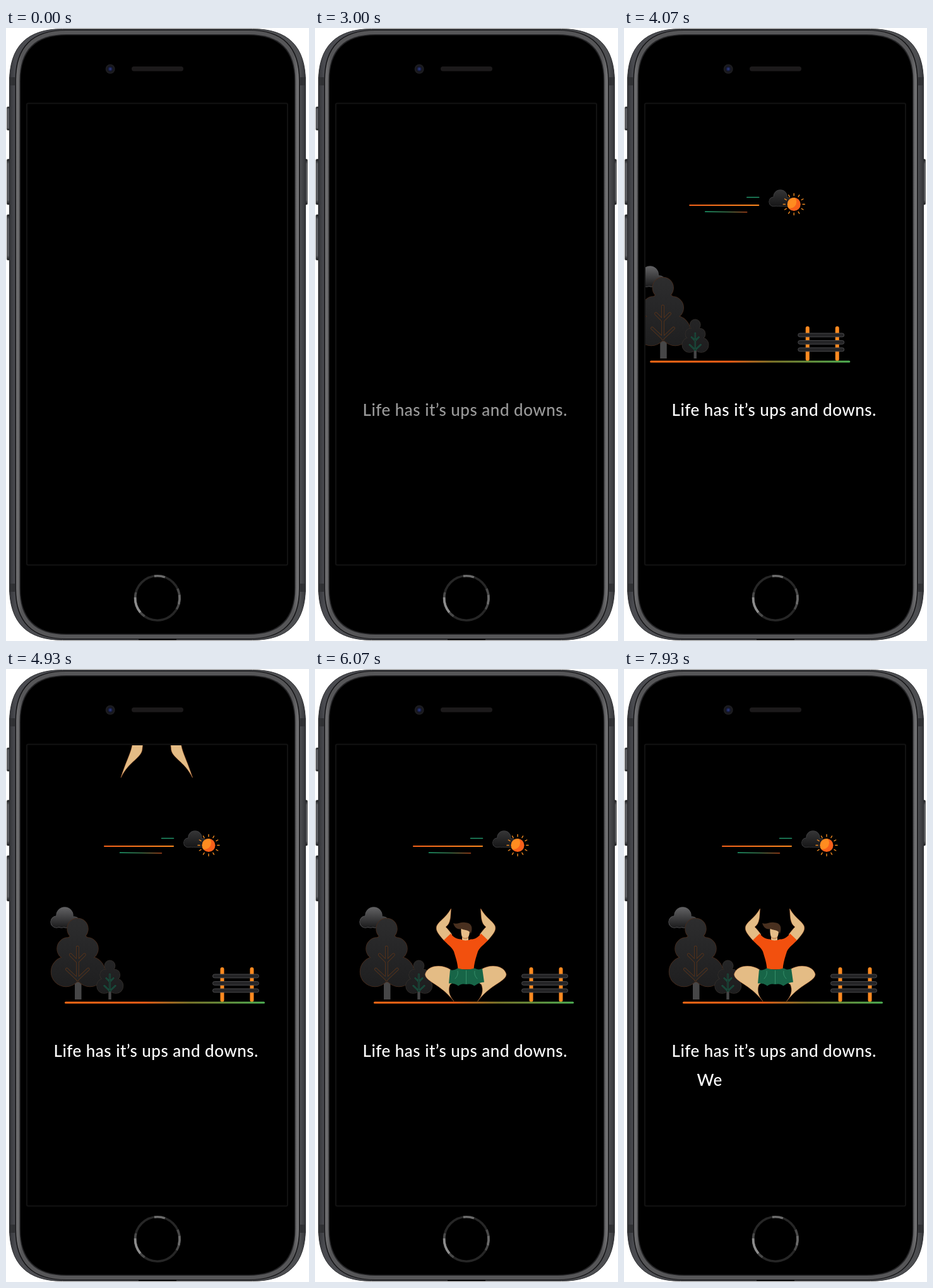
Recreate the animation shown at these times as an HTML page. Size 480x972 px, loop 8 s.

```html
<!DOCTYPE html>
<html lang="en">
<head>
<meta charset="utf-8">
<title>Life has it’s ups and downs</title>
<style>
html, body { margin: 0; width: 100%; height: 100%; overflow: hidden; background: #fff; }
svg { display: block; width: 480px; height: 972px; }
text { font: 500 26px Lato, "Open Sans", sans-serif; letter-spacing: .5px; fill: #fff; }
</style>
</head>
<body>
<svg viewBox="0 0 480 972">
  <defs>
    <clipPath id="screen"><rect x="34" y="121" width="411" height="729"/></clipPath>
    <linearGradient id="edge" x2="1" y2="0">
      <stop offset="0" stop-color="#6c6c6e"/><stop offset=".006" stop-color="#6c6c6e"/>
      <stop offset=".02" stop-color="#565658"/><stop offset=".98" stop-color="#565658"/>
      <stop offset=".994" stop-color="#6c6c6e"/><stop offset="1" stop-color="#7c7c7e"/>
    </linearGradient>
    <linearGradient id="shell" x2="1" y2="0">
      <stop offset="0" stop-color="#343539"/><stop offset=".018" stop-color="#4a4b50"/>
      <stop offset=".5" stop-color="#55565a"/><stop offset=".982" stop-color="#4d4e51"/>
      <stop offset="1" stop-color="#343539"/>
    </linearGradient>
    <linearGradient id="key" x2="0" y2="1">
      <stop offset="0" stop-color="#1c1d1f"/><stop offset=".1" stop-color="#5c5d61"/>
      <stop offset=".9" stop-color="#5c5d61"/><stop offset="1" stop-color="#1c1d1f"/>
    </linearGradient>
    <radialGradient id="lens">
      <stop offset="0" stop-color="#34418c"/><stop offset=".4" stop-color="#141a3c"/>
      <stop offset=".6" stop-color="#17171b"/><stop offset="1" stop-color="#202024"/>
    </radialGradient>
    <linearGradient id="ground" gradientUnits="userSpaceOnUse" x1="93" y1="0" x2="410" y2="0">
      <stop offset="0" stop-color="#ff6b16"/><stop offset=".4" stop-color="#ef5f17"/>
      <stop offset=".62" stop-color="#7f7a2c"/><stop offset="1" stop-color="#4fb254"/>
    </linearGradient>
    <linearGradient id="breeze" gradientUnits="userSpaceOnUse" x1="180" y1="0" x2="247" y2="0">
      <stop offset="0" stop-color="#1fa573"/><stop offset=".5" stop-color="#3a7b50"/>
      <stop offset="1" stop-color="#b3461b"/>
    </linearGradient>
    <linearGradient id="gust" gradientUnits="userSpaceOnUse" x1="155" y1="0" x2="266" y2="0">
      <stop offset="0" stop-color="#f4621a"/><stop offset="1" stop-color="#ff8a1f"/>
    </linearGradient>
    <linearGradient id="mist" gradientUnits="userSpaceOnUse" x1="0" y1="378" x2="0" y2="410">
      <stop offset="0" stop-color="#626264"/><stop offset="1" stop-color="#1c1c1d"/>
    </linearGradient>
    <linearGradient id="dusk" gradientUnits="userSpaceOnUse" x1="0" y1="257" x2="0" y2="283">
      <stop offset="0" stop-color="#353536"/><stop offset="1" stop-color="#161617"/>
    </linearGradient>
    <linearGradient id="leaf" gradientUnits="userSpaceOnUse" x1="0" y1="395" x2="0" y2="516">
      <stop offset="0" stop-color="#2d2d2e"/><stop offset="1" stop-color="#1d1d1e"/>
    </linearGradient>
    <clipPath id="disc"><circle cx="321" cy="279.5" r="10.5"/></clipPath>
  </defs>

  <g id="phone"></g>

  <g clip-path="url(#screen)">
    <g id="park"></g>
    <g id="man">
      <g id="legs" fill="#e4bc85" stroke="#c9753c" stroke-width=".5" stroke-linejoin="round">
        <path class="leg"/><path class="leg" transform="translate(477.5 0) scale(-1 1)"/>
      </g>
      <g id="body"></g>
    </g>
    <text id="line1" x="75.5" y="615">Life has it’s ups and downs.</text>
    <text id="line2" x="115.5" y="661">We</text>
  </g>
</svg>
<script>
const $ = id => document.getElementById(id);
const box = (x, y, w, h, r, fill, more = '') =>
  `<rect x="${x}" y="${y}" width="${w}" height="${h}" rx="${r}" fill="${fill}" ${more}/>`;
const stroke = (d, color, width, cap = 'round') =>
  `<path d="${d}" fill="none" stroke="${color}" stroke-width="${width}" stroke-linecap="${cap}" stroke-linejoin="round"/>`;

// box with smooth corners, centred on the phone's axis
function hull(x, y, r, fill, more = '') {
  const w = 480 - 2 * x, h = 972 - 2 * y, k = r * .67, s = r - k;
  const d = `M${x} ${y + r}c0 ${-k} ${s} ${-r} ${r} ${-r}h${w - 2 * r}c${k} 0 ${r} ${s} ${r} ${r}` +
    `v${h - 2 * r}c0 ${k} ${-s} ${r} ${-r} ${r}h${2 * r - w}c${-k} 0 ${-r} ${-s} ${-r} ${-r}Z`;
  return `<path d="${d}" fill="${fill}" ${more}/>`;
}

function arc(x, y, r, from, to) {
  const at = a => `${x + r * Math.cos(a * Math.PI / 180)} ${y + r * Math.sin(a * Math.PI / 180)}`;
  return `M${at(from)}A${r} ${r} 0 0 1 ${at(to)}`;
}

// overlapping circles merged into one outlined shape
function blob(circles, fill, line) {
  const all = circles.map(([x, y, r]) => `<circle cx="${x}" cy="${y}" r="${r}"/>`).join('');
  return `<g fill="${line}" stroke="${line}" stroke-width="1.4">${all}</g><g fill="${fill}">${all}</g>`;
}

function cloud(x, y, k, fill, line) {
  const shapes = [[10, 23, 9], [23, 13, 13], [38, 23.5, 8.5], [18, 24, 8], [25, 22, 10], [31, 23, 9]];
  return blob(shapes.map(([a, b, r]) => [x + a * k, y + b * k, r * k]), fill, line);
}

function twigs(x, y, k, color) {
  const d = `M${x} ${y}V${y + 52 * k}M${x - 17 * k} ${y + 35 * k}L${x} ${y + 51 * k}L${x + 17 * k} ${y + 35 * k}` +
    `M${x - 11 * k} ${y + 12 * k}L${x} ${y + 23 * k}L${x + 11 * k} ${y + 12 * k}`;
  return stroke(d, color, 4.6 * k) + stroke(d, '#242425', 4.6 * k - 1.4);
}

function drawPhone() {
  let s = '';
  for (const [x, y, h] of [[1.5, 125, 37], [1.5, 208, 72], [1.5, 296, 72], [472.5, 208, 72]])
    s += box(x, y, 5, h, 1.5, 'url(#key)', 'stroke="#2b2c2e" stroke-width=".6"');
  s += hull(5.5, 1.5, 84, 'url(#shell)', 'stroke="#2a2b2e" stroke-width="1"');
  for (const y of [78, 881]) for (const x of [5, 466]) s += box(x, y, 9, 13, 0, '#303134');
  s += box(210, 968, 60, 3, 1, '#19191b');
  s += hull(14.5, 3, 80, '#121214');
  s += hull(16, 4, 79, 'url(#edge)');
  s += hull(21.5, 10, 74, '#242426');
  s += hull(23, 11.5, 73, '#000');
  s += box(33, 119.5, 413, 732, 2, '#000', 'stroke="#121212" stroke-width="2"');
  s += box(199, 61, 82, 7.5, 3.7, '#1c1a1b');
  s += '<circle cx="165.2" cy="65" r="7.5" fill="url(#lens)"/>';

  const ring = (from, to, color) => stroke(arc(239.8, 904, 35.2, from, to), color, 3.6, 'butt');
  s += ring(0, 180, '#262626') + ring(180, 360, '#262626');
  s += ring(125, 195, '#484848') + ring(140, 182, '#8c8c8c');
  s += ring(262, 290, '#6a6a6a') + ring(-25, 30, '#484848') + ring(-8, 16, '#6a6a6a');
  $('phone').innerHTML = s;
}

function drawPark() {
  let s = stroke('M156 281H265', 'url(#gust)', 2.2) +
    stroke('M246.5 268.5H265.5', '#22966b', 1.5) +
    stroke('M180.5 291.2L246.5 292', 'url(#breeze)', 1.5);
  s += cloud(281, 257, .8, 'url(#dusk)', '#404042');

  let rays = '';
  for (let i = 0; i < 12; i++) {
    const a = i * Math.PI / 6, c = Math.cos(a), n = Math.sin(a);
    rays += `M${321 + 13.8 * c} ${279.5 + 13.8 * n}L${321 + 17 * c} ${279.5 + 17 * n}`;
  }
  s += stroke(rays, '#f08a22', 1.4);
  s += '<g clip-path="url(#disc)">' + box(310, 268, 22, 23, 0, '#f8601a') +
    '<circle cx="314.5" cy="275.5" r="10.5" fill="#ff8c20"/></g>';

  s += cloud(70, 378, 1, 'url(#mist)', '#58585a');
  s += box(109, 488, 10.5, 36, 0, '#464647');
  const crown = [[95, 480, 23.5], [133, 480, 23.5], [114, 472, 24], [98.5, 443.5, 17.5], [128.5, 443.5, 17.5],
    [114, 442, 22], [113.5, 412, 16.5]];
  s += blob(crown, 'url(#leaf)', '#4a2c1b') + twigs(113.3, 441, 1, '#633718');
  s += box(162.3, 506, 4.4, 18, 0, '#464647');
  const bush = [[155.5, 502.5, 11.5], [174, 502.5, 11.5], [165, 499, 12], [157.5, 485, 8.5], [172, 485, 8.5],
    [165, 484, 10], [164.5, 470.5, 8.2]];
  s += blob(bush, 'url(#leaf)', '#35302c') + twigs(164.5, 484, .52, '#126349');

  for (const x of [339.5, 386.5]) s += box(x, 473, 6, 55, 3, '#ff8a20');
  for (const y of [484, 495.5, 507]) s += box(327.5, y, 73, 5.8, 2.9, '#242426', 'stroke="#48484a" stroke-width="1"');
  s += stroke('M94.5 529H408.5', 'url(#ground)', 3.2);
  $('park').innerHTML = s;
}

function drawBody() {
  const flip = 'transform="translate(478 0) scale(-1 1)"';
  const arm = 'M204 430C196 421 190 414 193 407C198 398 207 395 215.5 380C214.5 392 215.5 403 207 409C211 413 214 417 217 421L208 432Z';
  const skin = 'fill="#e4bc85" stroke="#c9753c" stroke-width=".5"';
  let s = `<path d="${arm}" ${skin}/><path d="${arm}" ${skin} ${flip}/>`;
  s += '<path d="M231.5 410H245C245.5 419 244 423 243 425V432H233V425C231.5 421 231 416 231.5 410Z" fill="#e6bd88"/>';
  s += '<path d="M233 424C236 427 240 427 243 424V426.5C240 429 236 429 233 426Z" fill="#c98f5c"/>';
  s += '<path d="M219 403C226 405.5 230 400.5 238 402C248 402.5 251 410 246.500 420C244.5 413 238 415 232 412C226 414 221 410 219 403Z" fill="#49301f"/>';
  s += '<path d="M204 430L215 419.5C219 425 224 428.5 231 428.5C236 431 241 431 247 428.5C254 428.5 259 425 263 419.5L274 430C268 437 261 441 258 448C255 458 252 466 251.5 476.5H226.5C226 466 223 458 220 448C217 441 210 437 204 430Z" fill="#f2500e"/>';
  s += '<path d="M214 477C218 478 222 477 226 474.5C235 477 244 477 253 474.5C257 477 261 477 265 475L268 496.5C262 497 257 499 252.5 502.5C248 499 244 499 239.5 500C235 499 231 499 227 502.5C223 499 218 498 212 498.5Z" fill="#176547"/>';
  s += stroke('M239.5 478V499M226 479C227 484 225 488 222 491M253 479C252 484 254 488 257 491', '#3f9a74', .8);
  $('body').innerHTML = s;
}

// hip, knee, toe and crotch as four curves: straight and squatting
const straight = [213, 414, 208, 430, 203, 450, 200.5, 472, 198, 489, 192, 496, 182, 527,
  195, 500, 216, 496, 216, 480, 217, 468, 222, 450, 227, 437];
const squat = [215, 477, 200, 467, 178, 470, 174.5, 484, 175, 496, 199, 499, 220, 527,
  213, 518, 210, 510, 214, 500, 215, 500, 216, 499, 218, 497];

function legPath(k) {
  const p = straight.map((v, i) => v + (squat[i] - v) * k);
  return `M${p[0]} ${p[1]}C${p.slice(2).join(' ')}Z`;
}

const LOOP = 8000;
const part = (t, from, to) => Math.min(1, Math.max(0, (t - from) / (to - from)));
const easeOut = u => 1 - (1 - u) ** 3;
const smooth = u => u * u * (3 - 2 * u);

function render(t) {
  $('line1').setAttribute('opacity', part(t, 2510, 3330));
  $('line2').setAttribute('opacity', part(t, 7600, 7870));

  const slide = easeOut(part(t, 3770, 4390));
  $('park').setAttribute('transform', `translate(${-380 * (1 - slide)} 0)`);
  $('park').setAttribute('visibility', t < 3770 ? 'hidden' : 'visible');

  // falls with straight legs, then sinks into the squat
  const fall = part(t, 4790, 5160) ** 2;
  const bend = smooth(part(t, 5130, 5480));
  $('man').setAttribute('visibility', t < 4790 ? 'hidden' : 'visible');
  $('man').setAttribute('transform', `translate(0 ${-415 + 415 * fall})`);
  $('body').setAttribute('transform', `translate(0 ${-62 * (1 - bend)})`);
  const d = legPath(bend);
  document.querySelectorAll('.leg').forEach(leg => leg.setAttribute('d', d));
}

drawPhone();
drawPark();
drawBody();
const start = performance.now();
function tick() {
  render((performance.now() - start) % LOOP);
  requestAnimationFrame(tick);
}
tick();
</script>
</body>
</html>
```
